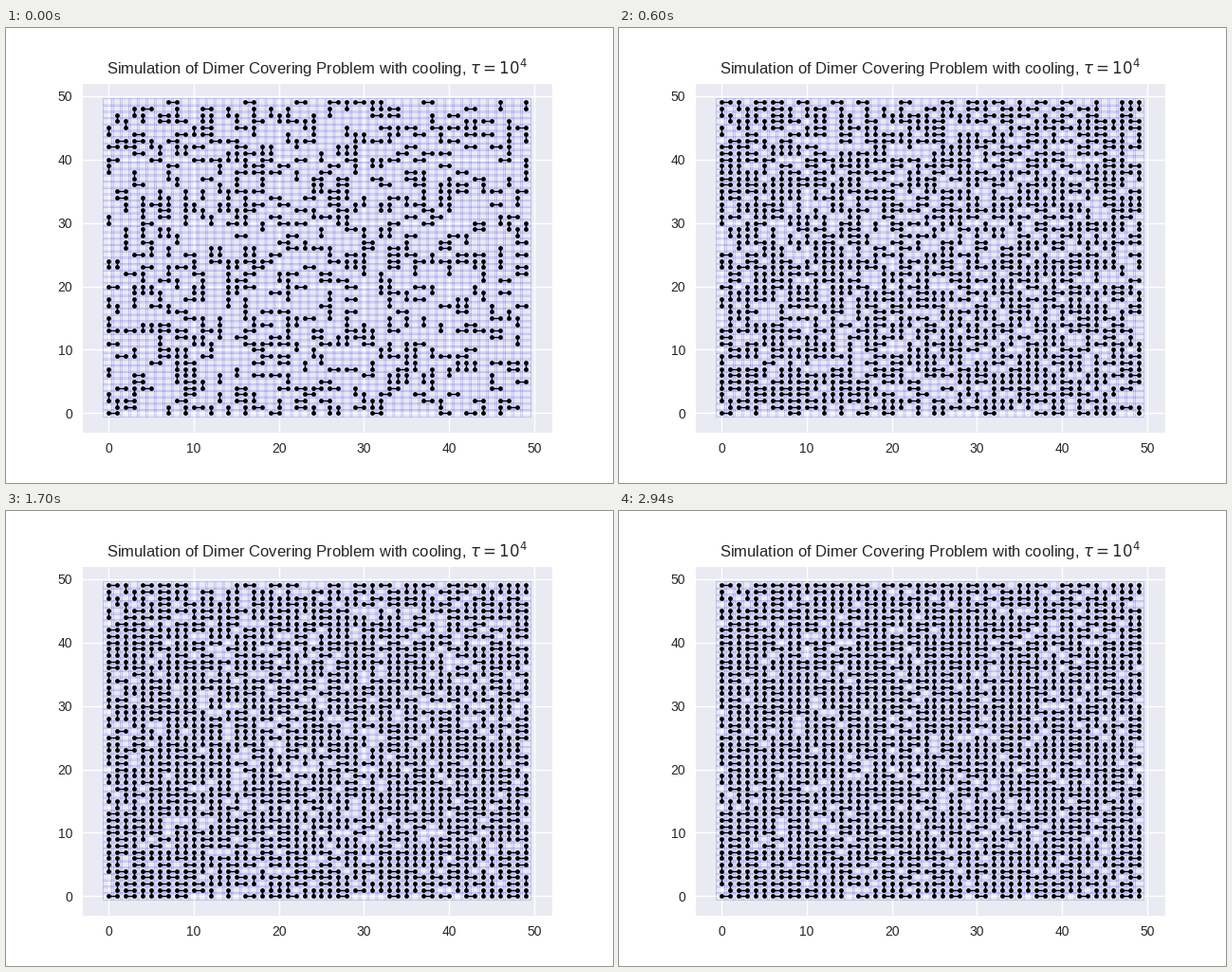
A matplotlib script that plays this animation: 640 by 480 pixels, repeating every 3850 ms.

```python
import math
import random

import matplotlib.pyplot as plt
import numpy as np
from matplotlib.animation import FuncAnimation

N = 50                # lattice sites per side
TAU = 1e4             # cooling time constant
MOVES = 500           # attempted moves between two states
STATES = 33
STEP = 50             # ms per drawn frame
LOOP = 3850
INK = "0.15"

plt.rcParams.update({
    "font.family": "Liberation Sans",
    "text.color": INK,
    "xtick.color": INK,
    "ytick.color": INK,
})


def neighbour(site):
    """Random adjacent site, or None when it falls off the lattice."""
    dx, dy = random.choice(((1, 0), (-1, 0), (0, 1), (0, -1)))
    x, y = site[0] + dx, site[1] + dy
    return (x, y) if 0 <= x < N and 0 <= y < N else None


def pick_edge():
    while True:
        site = (random.randrange(N), random.randrange(N))
        other = neighbour(site)
        if other:
            return site, other


def snapshot(partner):
    """Dimers as one polyline, broken by NaN between pairs."""
    points = []
    for a, b in partner.items():
        if a < b:
            points += [a, b, (math.nan, math.nan)]
    return np.array(points).T


def simulate():
    """Simulated annealing: fill empty pairs, remove dimers thermally."""
    random.seed(11)
    partner, states = {}, []
    # The first state shown already has two rounds of moves behind it.
    for move in range(1, (STATES + 1) * MOVES + 1):
        a, b = pick_edge()
        if a not in partner and b not in partner:
            partner[a], partner[b] = b, a
        elif partner.get(a) == b:
            temperature = math.exp(-move / TAU)
            if random.random() < math.exp(-1 / temperature):
                del partner[a], partner[b]
        if move % MOVES == 0 and move > MOVES:
            states.append(snapshot(partner))
    return states


def state_at(ms):
    """Steady pace at first, then a quicker run to the frozen state."""
    if ms < 2500:
        return ms // 100
    return min(STATES - 1, 25 + (ms - 2500) * 7 // 440)


def style_axes(ax):
    ax.set_facecolor("#EAEAF2")
    ax.set_axisbelow(True)
    ax.grid(color="white", lw=1)
    ax.tick_params(length=0, pad=7, labelsize=10)
    for spine in ax.spines.values():
        spine.set(color="white", linewidth=0.8)
    margin = 0.6 + 0.05 * (N + 0.2)
    ax.set_xlim(-margin, N - 1 + margin)
    ax.set_ylim(-margin, N - 1 + margin)
    ticks = range(0, N + 1, 10)
    ax.set_xticks(ticks)
    ax.set_yticks(ticks)
    ax.set_title(r"Simulation of Dimer Covering Problem with cooling, "
                 r"$\tau = 10^4$", fontsize=12)


def draw_cells(ax):
    """Borders of the slightly overlapping cells around each site."""
    sites = np.arange(N)
    edges = np.concatenate([sites - 0.6, sites + 0.6])
    pen = dict(colors="blue", alpha=0.2, lw=0.6, zorder=1.5, snap=False)
    ax.hlines(edges, -0.6, N - 0.4, **pen)
    ax.vlines(edges, -0.6, N - 0.4, **pen)


fig, ax = plt.subplots(figsize=(6.4, 4.8), dpi=100, facecolor="white")
fig.subplots_adjust(left=0.125, right=0.9, bottom=0.11, top=0.88)
style_axes(ax)
draw_cells(ax)

states = simulate()
dimers, = ax.plot(*states[0], "ko-", lw=1, ms=3.5, mew=0, snap=True, zorder=3)


def update(frame):
    dimers.set_data(*states[state_at(frame * STEP)])
    return dimers,


anim = FuncAnimation(fig, update, frames=LOOP // STEP, interval=STEP,
                     repeat=True, repeat_delay=0)
plt.show()
```
